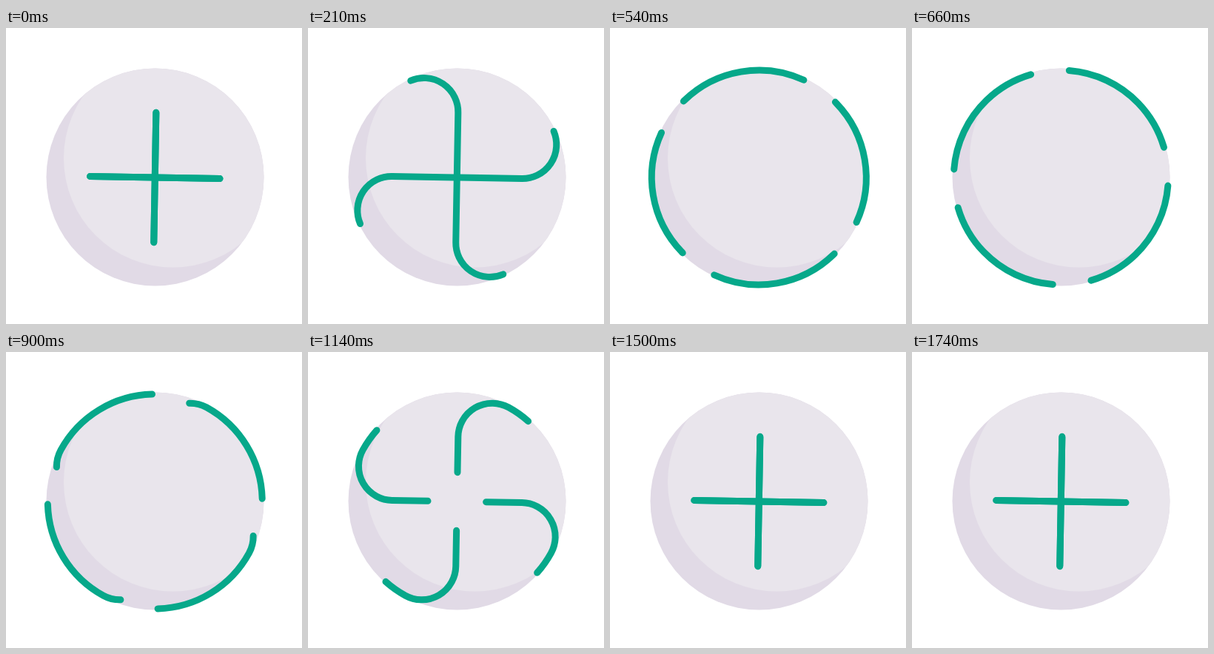
An HTML page that plays this animation: 400x400 px, repeating every 1.86 s.

```html
<!DOCTYPE html>
<html lang="en">
<head>
<meta charset="utf-8">
<title>Plus spinner</title>
<style>
  html, body { margin: 0; width: 100%; height: 100%; overflow: hidden; background: #fff; }
  svg { display: block; width: 100vw; height: 100vh; }

  .strokes {
    fill: none;
    stroke: #06a88a;
    stroke-width: 9;
    stroke-linecap: round;
    stroke-dasharray: 175.4 3000;
    animation: travel 1860ms infinite;
  }

  /* Distance each stroke has slid along its track: out, round the rim, back in */
  @keyframes travel {
    0%      { stroke-dashoffset: 0;       animation-timing-function: cubic-bezier(.333, 0, .667, .554); }
    20.968% { stroke-dashoffset: -239px;   animation-timing-function: cubic-bezier(.333, .319, .667, .669); }
    35.484% { stroke-dashoffset: -470px;   animation-timing-function: cubic-bezier(.333, .357, .667, .79); }
    48.387% { stroke-dashoffset: -660.6px; animation-timing-function: cubic-bezier(.333, .61, .667, .756); }
    53.763% { stroke-dashoffset: -688px;   animation-timing-function: cubic-bezier(.333, .103, .667, .511); }
    61.29%  { stroke-dashoffset: -778.6px; animation-timing-function: cubic-bezier(.333, .496, .667, .896); }
    70.968% { stroke-dashoffset: -893.6px; animation-timing-function: cubic-bezier(.333, 1, .667, 1); }
    83.871%, 100% { stroke-dashoffset: -907.6px; }
  }
</style>
</head>
<body>
<svg viewBox="0 0 400 400">
  <defs>
    <clipPath id="disc"><circle cx="201.5" cy="201.5" r="147"/></clipPath>
    <path id="track" d="M-87.7 0H87.7A46 46 0 0 0 128.4 -67.4A145 145 0 1 0 -67.4 128.4A46 46 0 0 0 0 87.7V-87.7"/>
  </defs>
  <circle cx="201.5" cy="201.5" r="147" fill="#e1dae6"/>
  <circle cx="225.5" cy="176" r="147.5" fill="#e9e5ec" clip-path="url(#disc)"/>
  <g class="strokes" transform="translate(201.3 202) rotate(1)">
    <use href="#track"/>
    <use href="#track" transform="rotate(90)"/>
    <use href="#track" transform="rotate(180)"/>
    <use href="#track" transform="rotate(270)"/>
  </g>
</svg>
</body>
</html>
```
